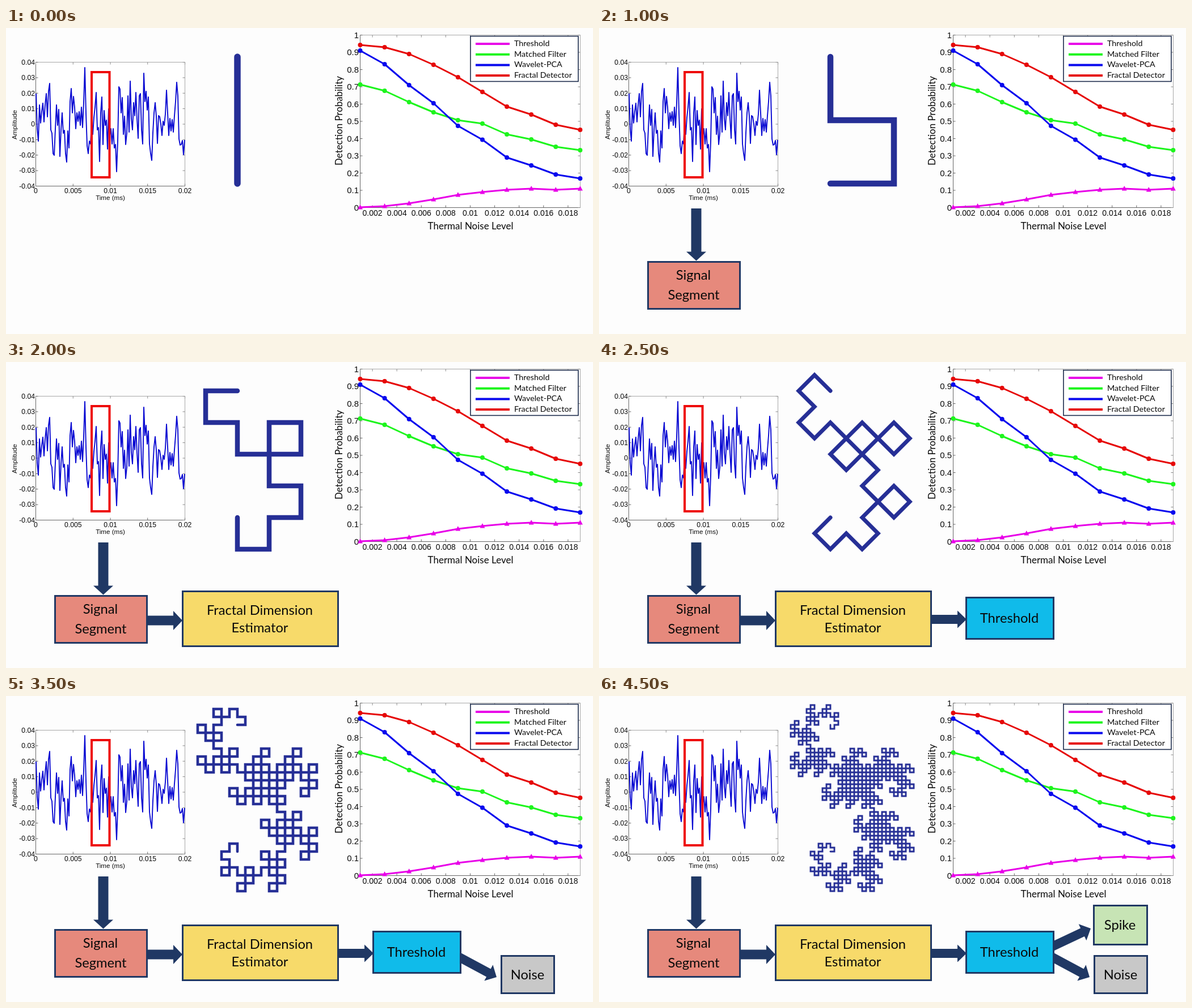
Animation of 1035 by 541 pixels, one loop 5000 ms. Source, as an HTML page with a canvas:

```html
<!DOCTYPE html>
<html lang="en">
<head>
<meta charset="utf-8">
<title>Fractal detector</title>
<style>
html, body { margin: 0; width: 100%; height: 100%; overflow: hidden; background: #fdfdfd; }
canvas { display: block; }
</style>
</head>
<body>
<canvas id="stage" width="1035" height="541"></canvas>
<script>
const ctx = document.getElementById('stage').getContext('2d');
const SANS = '"Liberation Sans", Arial, sans-serif';
const LABEL = 'Lato, "Open Sans", sans-serif';
const NAVY = '#203864';
const STEP = 500, LOOP = 5000;

// Signal heights, evenly spaced along the time axis
const signal = [
  116, 178, 200, 136, 168, 148, 133, 166, 136, 116, 157, 112, 98, 180, 186, 222, 225, 178,
  136, 172, 144, 227, 180, 150, 186, 181, 222, 237, 182, 212, 130, 107, 150, 121, 140, 178,
  150, 165, 148, 172, 140, 176, 132, 70, 150, 208, 222, 200, 205, 165, 188, 158, 140, 114,
  180, 176, 236, 150, 122, 206, 146, 172, 163, 214, 143, 190, 178, 205, 178, 212, 206, 254,
  200, 104, 108, 150, 123, 188, 156, 206, 186, 120, 184, 94, 160, 180, 132, 155, 114, 160,
  195, 120, 116, 180, 205, 80, 130, 112, 145, 122, 205, 222, 234, 185, 150, 132, 156, 204,
  155, 157, 170, 190, 165, 172, 152, 110, 150, 190, 160, 182, 162, 184, 155, 130, 96, 120,
  196, 207, 206, 199, 224, 198
];

const series = [
  { name: 'Threshold', color: '#e800e8', tri: true, y: [317, 315, 310, 303, 295, 290, 286, 284, 286, 284] },
  { name: 'Matched Filter', color: '#1df51d', y: [100, 111, 131, 149, 163, 169, 188, 197, 210, 216] },
  { name: 'Wavelet-PCA', color: '#0808ee', y: [40, 64, 101, 133, 173, 197.5, 229, 243, 259, 266] },
  { name: 'Fractal Detector', color: '#e60808', y: [30, 34, 46, 65, 87, 113, 139, 153, 171, 180] }
];

// Order of the dragon curve in each step, and line width per order
const orders = [0, 1, 2, 3, 4, 5, 6, 8, 9, 10];
const widths = [11.5, 11, 10.5, 10, 8.5, 7, 6, 5.3, 4.6, 3.7, 2.9];

function path(points, close) {
  ctx.beginPath();
  points.forEach(([x, y]) => ctx.lineTo(x, y));
  if (close) ctx.closePath();
}

function stroke(points, color, width) {
  path(points);
  ctx.strokeStyle = color;
  ctx.lineWidth = width;
  ctx.stroke();
}

function text(str, x, y, size, { family = SANS, align = 'center', base = 'middle', turn = 0 } = {}) {
  ctx.save();
  ctx.translate(x, y);
  ctx.rotate(turn);
  ctx.font = `${size}px ${family}`;
  ctx.textAlign = align;
  ctx.textBaseline = base;
  ctx.fillStyle = '#0a0a0a';
  ctx.fillText(str, 0, 0);
  ctx.restore();
}

function frame(l, t, r, b) {
  ctx.fillStyle = '#fff';
  ctx.fillRect(l, t, r - l, b - t);
  stroke([[l, t], [r, t], [r, b]], '#a8a8a8', 1);
  stroke([[l, t], [l, b], [r, b]], '#666', 1);
}

function tickX(x, t, b) {
  stroke([[x, b], [x, b - 4]], '#666', 1);
  stroke([[x, t], [x, t + 4]], '#888', 1);
}

function tickY(y, l, r) {
  stroke([[l, y], [l + 4, y]], '#666', 1);
  stroke([[r, y], [r - 4, y]], '#888', 1);
}

function signalPlot() {
  const l = 52.5, r = 315.5, t = 60.5, b = 279.5;
  frame(l, t, r, b);
  for (let i = 0; i <= 8; i++) {
    const y = t + i * (b - t) / 8;
    tickY(y, l, r);
    text(i === 4 ? '0' : String((4 - i) / 100), 51, y + 1, 12.2, { align: 'right' });
  }
  for (let i = 0; i <= 4; i++) {
    const x = l + i * (r - l) / 4;
    tickX(x, t, b);
    text(String(i * 5 / 1000), x, 289, 12.2);
  }
  text('Time (ms)', 184, 301, 11.6);
  text('Amplitude', 16, 171, 11.7, { turn: -Math.PI / 2 });

  ctx.lineJoin = 'round';
  const dx = 262 / (signal.length - 1);
  stroke(signal.map((y, i) => [53 + i * dx, y]), '#0909d2', 1.9);
  ctx.lineJoin = 'miter';
  ctx.strokeStyle = '#ee0505';
  ctx.lineWidth = 4;
  ctx.strokeRect(151, 78, 31.5, 186);
}

function marker(x, y, tri) {
  if (tri) {
    path([[x, y - 5], [x + 4.5, y + 3.5], [x - 4.5, y + 3.5]], true);
  } else {
    ctx.beginPath();
    ctx.arc(x, y, 4, 0, 7);
  }
  ctx.fill();
}

function resultPlot() {
  const l = 624.5, r = 1012.5, t = 12.5, b = 317.5;
  frame(l, t, r, b);
  for (let i = 0; i <= 10; i++) {
    const y = b - i * (b - t) / 10;
    tickY(y, l, r);
    text(String(i / 10), 622, y + 1, 15, { align: 'right' });
  }
  for (let i = 1; i <= 9; i++) {
    const x = l + (2 * i - 1) * (r - l) / 18;
    tickX(x, t, b);
    text(String(2 * i / 1000), x, 328, 14);
  }
  text('Thermal Noise Level', 819, 356, 17, { family: LABEL, base: 'alphabetic' });
  text('Detection Probability', 593, 164, 16.9, { family: LABEL, base: 'alphabetic', turn: -Math.PI / 2 });

  ctx.lineJoin = 'round';
  for (const s of series) {
    const pts = s.y.map((y, i) => [624.5 + i * 43.1, y]);
    stroke(pts, s.color, 3);
    ctx.fillStyle = s.color;
    pts.forEach(([x, y]) => marker(x, y, s.tri));
  }
  ctx.lineJoin = 'miter';

  ctx.fillStyle = '#fff';
  ctx.fillRect(819, 14, 190, 81);
  ctx.strokeStyle = '#1b2a4a';
  ctx.lineWidth = 1.6;
  ctx.strokeRect(819, 14.5, 190, 80);
  series.forEach((s, i) => {
    const y = 28 + i * 18.7;
    stroke([[828, y], [888, y]], s.color, 4);
    text(s.name, 896, y + 4, 14.3, { family: LABEL, align: 'left', base: 'alphabetic' });
  });
}

// Every segment folds into a right angle, sides alternating
function dragon(order) {
  let pts = [[408, 51], [408, 275]];
  for (let n = 1; n <= order; n++) {
    const next = [pts[0]];
    for (let i = 1; i < pts.length; i++) {
      const [x0, y0] = pts[i - 1], [x1, y1] = pts[i];
      const side = (n === 1) === (i % 2 === 1) ? 1 : -1;
      next.push([
        (x0 + x1 + side * (y1 - y0)) / 2,
        (y0 + y1 - side * (x1 - x0)) / 2
      ], pts[i]);
    }
    pts = next;
  }
  return pts;
}

const curves = orders.map(dragon);

function arrow(x0, y0, x1, y1, half, headHalf) {
  const len = Math.hypot(x1 - x0, y1 - y0), neck = len - 16;
  ctx.save();
  ctx.translate(x0, y0);
  ctx.rotate(Math.atan2(y1 - y0, x1 - x0));
  path([[0, -half], [neck, -half], [neck, -headHalf], [len, 0],
    [neck, headHalf], [neck, half], [0, half]], true);
  ctx.fillStyle = NAVY;
  ctx.fill();
  ctx.restore();
}

function box(l, t, r, b, fill, lines) {
  ctx.fillStyle = fill;
  ctx.fillRect(l, t, r - l, b - t);
  ctx.strokeStyle = NAVY;
  ctx.lineWidth = 3;
  ctx.strokeRect(l + 1.5, t + 1.5, r - l - 3, b - t - 3);
  for (const [str, x, y] of lines) {
    text(str, x, y, 23.7, { family: LABEL, base: 'alphabetic' });
  }
}

function flow(step) {
  if (step >= 9) arrow(797, 444, 867, 411, 8, 16);
  if (step >= 7) arrow(797, 460.5, 865, 497, 8, 16);
  if (step >= 1) {
    arrow(171.5, 319, 171.5, 411.5, 9, 17.5);
    box(85, 412, 250, 498, '#e6897c', [['Signal', 166.5, 445], ['Segment', 167, 480]]);
  }
  if (step >= 3) {
    arrow(249, 457, 311, 457, 8.5, 17);
    box(310, 404, 587, 504, '#f7da6a', [['Fractal Dimension', 447.5, 447], ['Estimator', 447.5, 478]]);
  }
  if (step >= 5) {
    arrow(586, 455, 648, 455, 8, 15.5);
    box(646, 415, 803, 491, '#10bbea', [['Threshold', 723.5, 461]]);
  }
  if (step >= 7) box(872, 458, 968, 527, '#c8c8c8', [['Noise', 919.5, 501]]);
  if (step >= 9) box(871, 369, 968, 441, '#c7e4b5', [['Spike', 918.5, 413]]);
}

function draw(now) {
  const step = Math.floor((now % LOOP) / STEP);
  ctx.fillStyle = '#fdfdfd';
  ctx.fillRect(0, 0, 1035, 541);
  signalPlot();
  resultPlot();
  ctx.lineCap = 'round';
  stroke(curves[step], '#262f96', widths[orders[step]]);
  ctx.lineCap = 'butt';
  flow(step);
  requestAnimationFrame(draw);
}
requestAnimationFrame(draw);
</script>
</body>
</html>
```
